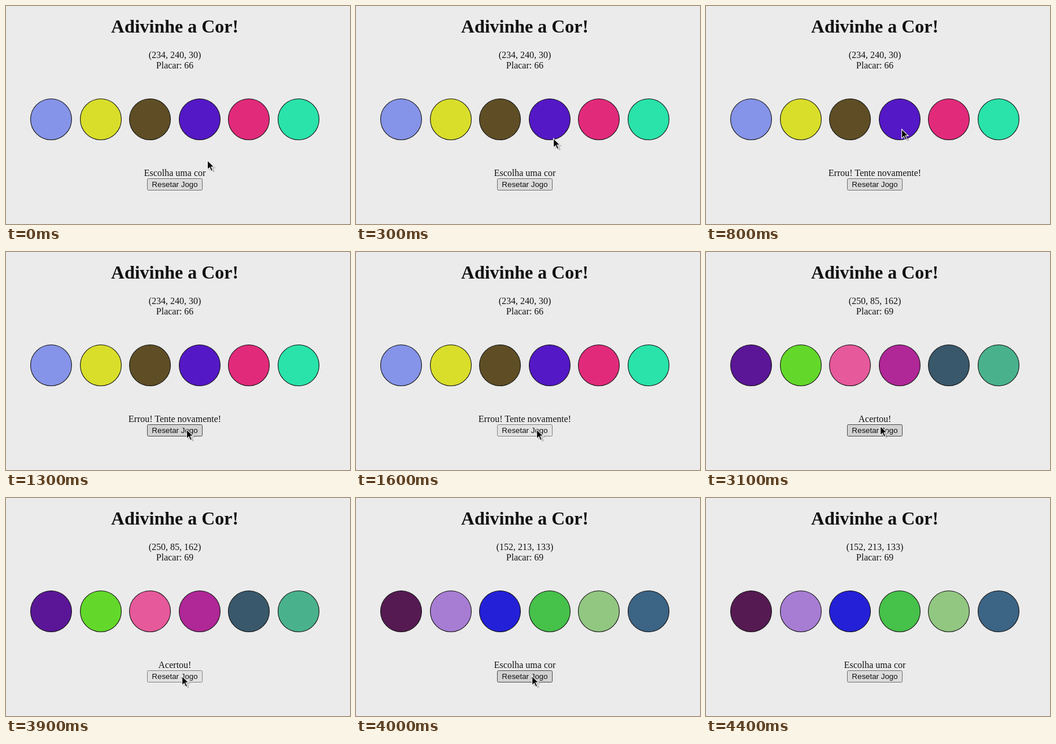
An HTML page for the animation above (5.1 s loop, 595x377 px).

```html
<!DOCTYPE html>
<html lang="pt-BR">
<head>
<meta charset="utf-8">
<title>Adivinhe a Cor!</title>
<style>
  html, body { margin: 0; width: 100%; height: 100%; overflow: hidden; background: #ebebeb; }
  svg { display: block; width: 595px; height: 377px; }
  text { font: 16px "Liberation Serif", "Times New Roman", serif; fill: #111; text-anchor: middle; }
  .title { font-size: 32px; font-weight: bold; }
  .label { font: 13.333px "Liberation Sans", Arial, sans-serif; }
  circle { stroke: #111; stroke-width: 1.1; }
  #button { fill: #dcdcdc; stroke: #6d6d6d; }
  #button.hover { fill: #d2d2d2; stroke: #494949; }
  #button.active { fill: #e2e2e2; stroke: #828282; }
</style>
</head>
<body>
<svg viewBox="0 0 595 377">
  <text class="title" x="292" y="46">Adivinhe a Cor!</text>
  <text id="rgb" x="292" y="90"></text>
  <text id="score" x="292" y="108"></text>
  <g id="dots"></g>
  <text id="status" x="292" y="294"></text>
  <rect id="button" x="244.5" y="298.5" width="95" height="20" rx="2"/>
  <text class="label" x="292" y="313">Resetar Jogo</text>
  <g id="cursor">
    <path d="M3.5 3v16l3.8-3.6 2.7 6.2 3-1.2-2.7-6h5z" fill="#000" opacity=".22"/>
    <path d="M.5 1v16l3.8-3.6 2.7 6.2 2.7-1.2-2.7-6h5z" fill="#0a0a0a" stroke="#f4f4f4" stroke-width="1.1"/>
  </g>
</svg>
<script>
const LOOP = 5100;
const STEP = 100;

const rounds = [
  { start: 0, rgb: "(234, 240, 30)", colors: "#8594e8 #d9de2a #5f4e25 #5418c6 #e22a7b #29e3aa" },
  { start: 1700, rgb: "(250, 85, 162)", colors: "#5a1697 #63d82a #e6599b #b02797 #39586b #49b28d" },
  { start: 4000, rgb: "(152, 213, 133)", colors: "#551a52 #a77dd4 #2320d8 #46c14a #92c781 #3c6485" }
];
const guesses = [
  { time: 800, reply: "Errou! Tente novamente!" },
  { time: 2700, reply: "Acertou!", points: 3 }
];

// Each move eases the pointer from where the previous one ended.
const origin = { x: 348, y: 266 };
const moves = [
  { from: 200, to: 500, x: 338, y: 212 },
  { from: 800, to: 1300, x: 312, y: 306 },
  { from: 1700, to: 2100, x: 252, y: 193 },
  { from: 2800, to: 3300, x: 304, y: 307 },
  { from: 4100, to: 4400, x: 306, y: 323 }
];
const pointerGone = moves.at(-1).to;

const el = id => document.getElementById(id);
const lerp = (a, b, k) => a + (b - a) * k;
const easeOut = k => 1 - (1 - k) ** 3;

const dots = Array.from({ length: 6 }, (_, i) => {
  const dot = document.createElementNS("http://www.w3.org/2000/svg", "circle");
  dot.setAttribute("cx", Math.round(78 + 85.6 * i));
  dot.setAttribute("cy", 196);
  dot.setAttribute("r", 35.5);
  return el("dots").appendChild(dot);
});

function pointerAt(t) {
  return moves.reduce((p, { from, to, x, y }) => {
    const k = easeOut(Math.min(1, Math.max(0, (t - from) / (to - from))));
    return { x: lerp(p.x, x, k), y: lerp(p.y, y, k) };
  }, origin);
}

function render(time) {
  const t = Math.floor(time / STEP) * STEP;

  const round = rounds.findLast(r => r.start <= t);
  const made = guesses.filter(g => g.time <= t);
  const reply = made.findLast(g => g.time >= round.start)?.reply;
  const score = made.reduce((sum, g) => sum + (g.points ?? 0), 66);
  el("rgb").textContent = round.rgb;
  el("score").textContent = `Placar: ${score}`;
  el("status").textContent = reply ?? "Escolha uma cor";
  round.colors.split(" ").forEach((color, i) => dots[i].setAttribute("fill", color));

  const { x, y } = pointerAt(t);
  const visible = t < pointerGone;
  el("cursor").style.display = visible ? "" : "none";
  el("cursor").setAttribute("transform", `translate(${Math.round(x)} ${Math.round(y)})`);

  // The button is held down for one step before a new round.
  const pressed = rounds.some(r => r.start === t + STEP);
  const over = visible && y >= 297 && y < 320;
  el("button").setAttribute("class", pressed ? "active" : over ? "hover" : "");
}

const start = performance.now();
function tick() {
  render((performance.now() - start) % LOOP);
  requestAnimationFrame(tick);
}
tick();
</script>
</body>
</html>
```
